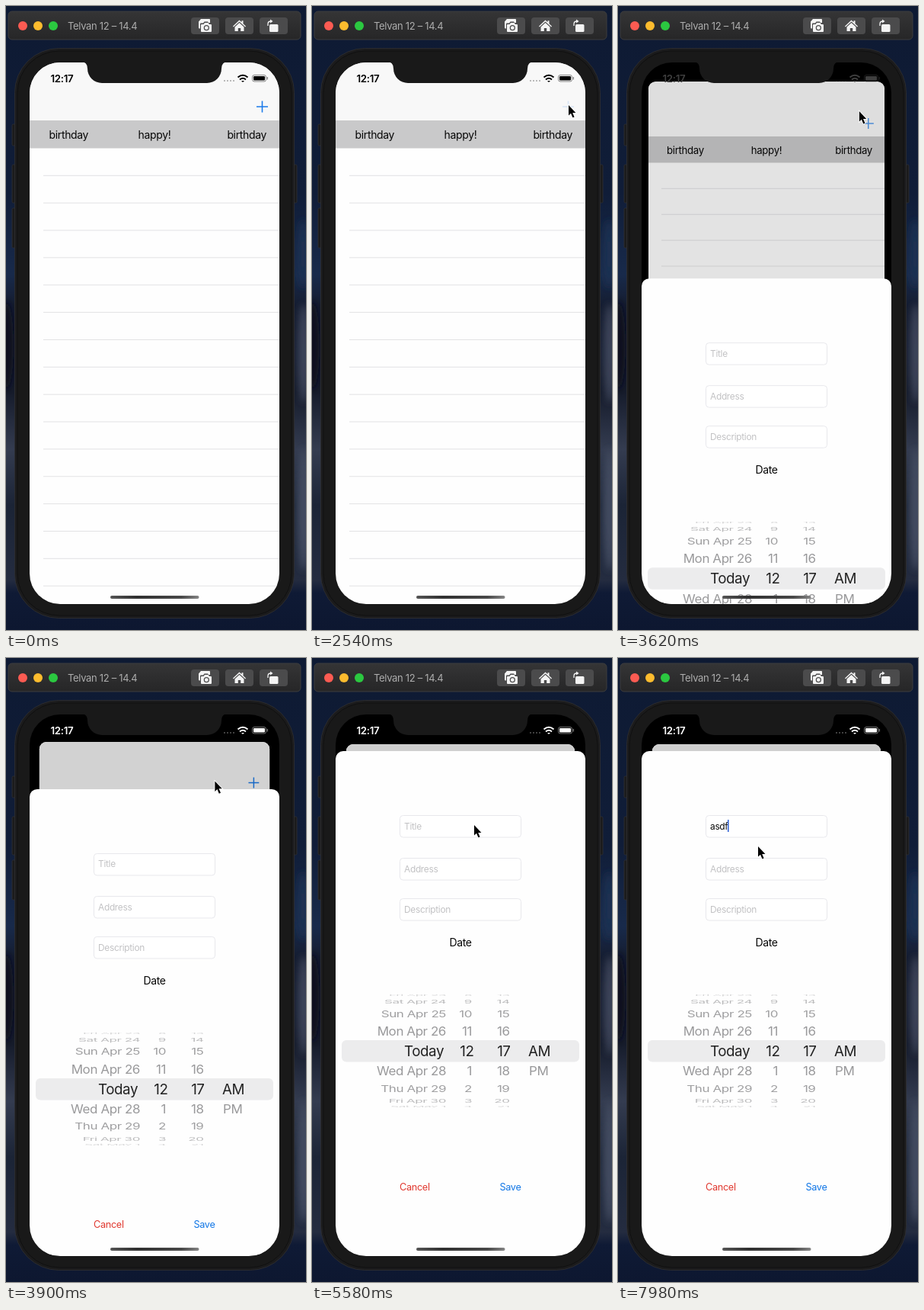
An HTML page that plays this animation: 394x818 px, repeating every 8000 ms.

```html
<!DOCTYPE html>
<html lang="en">
<head>
<meta charset="utf-8">
<title>Calendar sheet</title>
<style>
  html, body { margin: 0; width: 100%; height: 100%; overflow: hidden; background: #101a30; }
  svg { display: block; width: 394px; height: 818px; }
  text { font-family: Inter, Roboto, sans-serif; letter-spacing: -.025em; white-space: pre; }
  .mid { text-anchor: middle; }
  .end { text-anchor: end; }
  .body { font-size: 14px; fill: #060606; }
  .field { font-size: 11.9px; }
  .hint { fill: #c2c2c4; }
  .action { font-size: 12.7px; }
  .wheel { font-size: 17px; letter-spacing: -.03em; fill: #8e8e90; }
  .wheel .now { font-size: 18.8px; letter-spacing: -.04em; fill: #222; }
</style>
</head>
<body>
<svg viewBox="0 0 394 818">
  <defs>
    <clipPath id="screen"><rect x="31" y="74" width="328" height="710" rx="40"/></clipPath>
    <linearGradient id="wall" x2="0" y2="1">
      <stop offset="0" stop-color="#0e1a33"/>
      <stop offset=".3" stop-color="#101d38"/>
      <stop offset=".43" stop-color="#182a4b"/>
      <stop offset=".48" stop-color="#151d31"/>
      <stop offset=".62" stop-color="#161c2c"/>
      <stop offset=".71" stop-color="#343c50"/>
      <stop offset=".8" stop-color="#1b2436"/>
      <stop offset=".92" stop-color="#242c40"/>
      <stop offset=".94" stop-color="#0f1a35"/>
      <stop offset="1" stop-color="#0d1730"/>
    </linearGradient>
    <linearGradient id="bar" x2="0" y2="1">
      <stop offset="0" stop-color="#353536"/>
      <stop offset="1" stop-color="#262627"/>
    </linearGradient>
    <linearGradient id="home">
      <stop offset="0" stop-color="#555"/>
      <stop offset=".3" stop-color="#303030"/>
      <stop offset=".8" stop-color="#484848"/>
      <stop offset="1" stop-color="#858585"/>
    </linearGradient>
    <filter id="soft" x="-100%" width="300%"><feGaussianBlur stdDeviation="5"/></filter>
  </defs>

  <rect width="394" height="818" fill="url(#wall)"/>
  <g filter="url(#soft)">
    <ellipse cx="390" cy="325" rx="7" ry="45" fill="#1d3052"/>
    <ellipse cx="391" cy="455" rx="8" ry="65" fill="#3c445a"/>
    <ellipse cx="391" cy="660" rx="9" ry="80" fill="#434b60"/>
    <ellipse cx="0" cy="445" rx="10" ry="58" fill="#0b101b"/>
  </g>

  <!-- window bar -->
  <rect x="3" y="7" width="384" height="37" rx="5" fill="url(#bar)" stroke="#3d3d3e"/>
  <circle cx="22" cy="26" r="6" fill="#fc5b52"/>
  <circle cx="42" cy="26" r="6" fill="#fdbc2e"/>
  <circle cx="62" cy="26" r="6" fill="#2bc840"/>
  <text x="81" y="31" font-size="13" fill="#adadad">Telvan 12 – 14.4</text>
  <g fill="#4b4b4c">
    <rect x="243" y="15" width="37" height="22" rx="4"/>
    <rect x="288" y="15" width="37" height="22" rx="4"/>
    <rect x="333" y="15" width="37" height="22" rx="4"/>
  </g>
  <g fill="#f4f4f4">
    <path d="M256 17h11q1 0 1 1v4h-2l-1-1.500h-4.500l-1.500 2h-3q-1 0-1 1v6h-1q-1 0-1-1v-8z"/>
    <path d="M257 24h2.500l1.500-2h4.500l1.500 2h2q1 0 1 1v8q0 1-1 1h-12q-1 0-1-1v-8q0-1 1-1z"/>
    <circle cx="263.300" cy="28.700" r="3" fill="none" stroke="#4b4b4c" stroke-width="1.200"/>
    <path d="M298 26.500l8.500-8 3 2.800v-2h2v4l3.500 3.200-.8 1-7.700-7-7.700 7z"/>
    <path d="M300.500 27.500l6-5.500 6 5.500v5.500h-4.300v-4h-3.400v4h-4.300z"/>
    <rect x="346" y="24" width="11.500" height="10" rx="1.500"/>
    <path d="M344 26v-2.500q0-3.500 4-3.500" fill="none" stroke="#f4f4f4" stroke-width="1.300"/>
    <path d="M347 17.500l3.500 2.500-3.500 2.500z"/>
  </g>

  <!-- phone body -->
  <g fill="#1b1b1c" stroke="#303033" stroke-width=".8">
    <rect x="8" y="155" width="6" height="28" rx="1.500"/>
    <rect x="8" y="208" width="6" height="50" rx="1.500"/>
    <rect x="8" y="265" width="6" height="52" rx="1.500"/>
    <rect x="376" y="208" width="6" height="50" rx="1.500"/>
    <rect x="11.500" y="55.500" width="367" height="747" rx="58"/>
  </g>
  <rect x="15" y="59" width="360" height="740" rx="55" fill="#191919" stroke="#101010"/>

  <g clip-path="url(#screen)">
    <rect x="31" y="74" width="328" height="710"/>
    <g id="card">
      <rect x="31" y="74" width="328" height="730" rx="10" fill="#fefefe"/>
      <path d="M31 150V84a10 10 0 0 1 10-10h308a10 10 0 0 1 10 10v66z" fill="#f8f8f8"/>
      <g id="rules" stroke="#e2e2e4"></g>
      <rect x="31" y="150" width="328" height="36.500" fill="#c9c9ca"/>
      <path id="plus" d="M329 132h15M336.500 124.500v15" stroke="#1b7bea" stroke-width="1.600"/>
      <rect id="dim" x="31" y="74" width="328" height="730" rx="10"/>
      <g class="body">
        <text x="56.500" y="174">birthday</text>
        <text x="195" y="174" class="mid">happy!</text>
        <text x="342" y="174" class="end">birthday</text>
      </g>
    </g>

    <!-- contents are placed relative to the top of the sheet -->
    <g id="sheet">
      <rect x="31" width="328" height="700" rx="10" fill="#fefefe"/>
      <g fill="#fff" stroke="#e8e8ec">
        <rect x="115.500" y="84.500" width="159" height="28.500" rx="4"/>
        <rect x="115.500" y="140.500" width="159" height="28.500" rx="4"/>
        <rect x="115.500" y="193.500" width="159" height="28.500" rx="4"/>
      </g>
      <text id="entry" class="field" x="121" y="102.500"></text>
      <rect id="caret" y="90" width="1.600" height="16" fill="#3566d6"/>
      <text class="field hint" x="121" y="159">Address</text>
      <text class="field hint" x="121" y="212">Description</text>
      <text class="body mid" x="195" y="256">Date</text>
      <rect x="39" y="379" width="312" height="28.500" rx="6" fill="#ececed"/>
      <g id="wheel" class="wheel"></g>
      <text class="action" x="115" y="575.500" fill="#e0382f">Cancel</text>
      <text class="action end" x="274.500" y="575.500" fill="#1277e6">Save</text>
    </g>

    <g id="status">
      <text x="58.500" y="99.500" font-size="13.300" font-weight="600">12:17</text>
      <path d="M286 98h14" stroke="currentColor" stroke-width="2" stroke-dasharray="2 2" opacity=".25"/>
      <g fill="none" stroke="currentColor" stroke-width="2">
        <path d="M304.500 93.500q6.500-5.500 13 0M307 96.500q4-3.500 8 0"/>
        <path d="M309 98l2 2 2-2z" fill="currentColor" stroke="none"/>
      </g>
      <rect x="323.500" y="90.500" width="18" height="8.500" rx="2.500" fill="none" stroke="currentColor" opacity=".45"/>
      <rect x="325" y="92" width="15" height="5.500" rx="1.200"/>
      <rect x="342.800" y="93" width="1.200" height="3.500" opacity=".5"/>
    </g>
    <rect x="137" y="773" width="116.500" height="4" rx="2" fill="url(#home)"/>
  </g>
  <path d="M98 73q9 0 9 9a19 19 0 0 0 19 19h138a19 19 0 0 0 19-19q0-9 9-9z" fill="#191919"/>
  <path id="pointer" d="M0 0v13.500l3-2.800 2.400 5.600 2.200-.9-2.400-5.500h4.200z" stroke="#fff" stroke-width="1.600" paint-order="stroke"/>
</svg>

<script>
const LOOP = 8000;
const $ = id => document.getElementById(id);
const clamp = v => Math.min(1, Math.max(0, v));
const ramp = (t, from, to) => clamp((t - from) / (to - from));
const smooth = v => v * v * (3 - 2 * v);

function add(parent, name, attributes, content = '') {
  const node = document.createElementNS('http://www.w3.org/2000/svg', name);
  for (const key in attributes) node.setAttribute(key, attributes[key]);
  node.textContent = content;
  parent.append(node);
  return node;
}

for (let i = 0; i < 16; i++) {
  const y = 222.300 + i * 35.860;
  add($('rules'), 'path', { d: `M49 ${y}H359` });
}

// Picker rows foreshorten away from the selected one.
const distance = [0, 26.300, 49, 65, 73];
const squash = [1, .94, .7, .4, .14];
const fade = [1, .9, .85, .6, .35];
const days = ['Fri Apr 23', 'Sat Apr 24', 'Sun Apr 25', 'Mon Apr 26', 'Today',
  'Wed Apr 28', 'Thu Apr 29', 'Fri Apr 30', 'Sat May 1'];
days.forEach((day, i) => {
  const step = i - 4, n = Math.abs(step), now = n === 0;
  const row = add($('wheel'), 'g', {
    transform: `translate(0 ${393.200 + Math.sign(step) * distance[n]}) scale(1 ${squash[n]})`,
    opacity: fade[n], class: now ? 'now' : ''
  });
  const cell = (x, value, anchor = 'end') =>
    add(row, 'text', { x, y: now ? 6.800 : 6.200, class: anchor }, value);
  cell(now ? 173 : 176, day);
  cell(now ? 212.500 : 210, (step + 11) % 12 + 1);
  cell(now ? 260.500 : 259.500, 17 + step);
  if (now) cell(284, 'AM', '');
  if (step === 1) cell(285, 'PM', '');
});

// time, x, y
const route = [
  [320, 396, 420], [860, 323, 271], [1700, 334, 150], [2300, 337, 130],
  [3380, 337, 130], [3620, 317, 138], [4220, 226, 188], [5000, 213, 219],
  [6100, 213, 219], [6800, 184, 247], [LOOP, 184, 247]
];

function pointerAt(t) {
  const i = Math.max(1, route.findIndex(stop => stop[0] > t));
  const [t0, x0, y0] = route[i - 1], [t1, x1, y1] = route[i];
  const k = ramp(t, t0, t1);
  return [x0 + (x1 - x0) * k, y0 + (y1 - y0) * k];
}

// Critically damped spring.
function presented(t) {
  const u = Math.max(0, t - 3320) * .0073;
  return 1 - (1 + u) * Math.exp(-u);
}

const FOCUS = 5900;
const keyTimes = [6800, 7050, 7300, 7550];

function draw(t) {
  const p = presented(t);
  $('sheet').setAttribute('transform', `translate(0 ${784 - 662 * p})`);
  $('card').setAttribute('transform',
    `translate(195 ${74 + 39 * p}) scale(${1 - .085 * p}) translate(-195 -74)`);
  $('dim').setAttribute('opacity', .165 * p);
  $('plus').setAttribute('opacity', 1 - .85 * ramp(t, 2400, 2520) * (1 - ramp(t, 3240, 3800)));

  const light = 255 * smooth(ramp(p, .5, .95));
  const tone = `rgb(${light},${light},${light})`;
  $('status').setAttribute('fill', tone);
  $('status').setAttribute('color', tone);

  const typed = 'asdf'.slice(0, keyTimes.filter(k => t >= k).length);
  const entry = $('entry');
  entry.textContent = typed || 'Title';
  entry.setAttribute('fill', typed ? '#0a0a0a' : '#c2c2c4');
  const blinkOn = t >= keyTimes[0] || (t - FOCUS) % 1000 < 600;
  $('caret').setAttribute('visibility', t >= FOCUS && blinkOn ? 'visible' : 'hidden');
  $('caret').setAttribute('x', 120.500 + (typed ? entry.getComputedTextLength() : 0));

  $('pointer').setAttribute('visibility', t < route[0][0] ? 'hidden' : 'visible');
  $('pointer').setAttribute('transform', `translate(${pointerAt(t)})`);
}

const start = performance.now();
function tick() {
  draw((performance.now() - start) % LOOP);
  requestAnimationFrame(tick);
}
tick();
</script>
</body>
</html>
```
